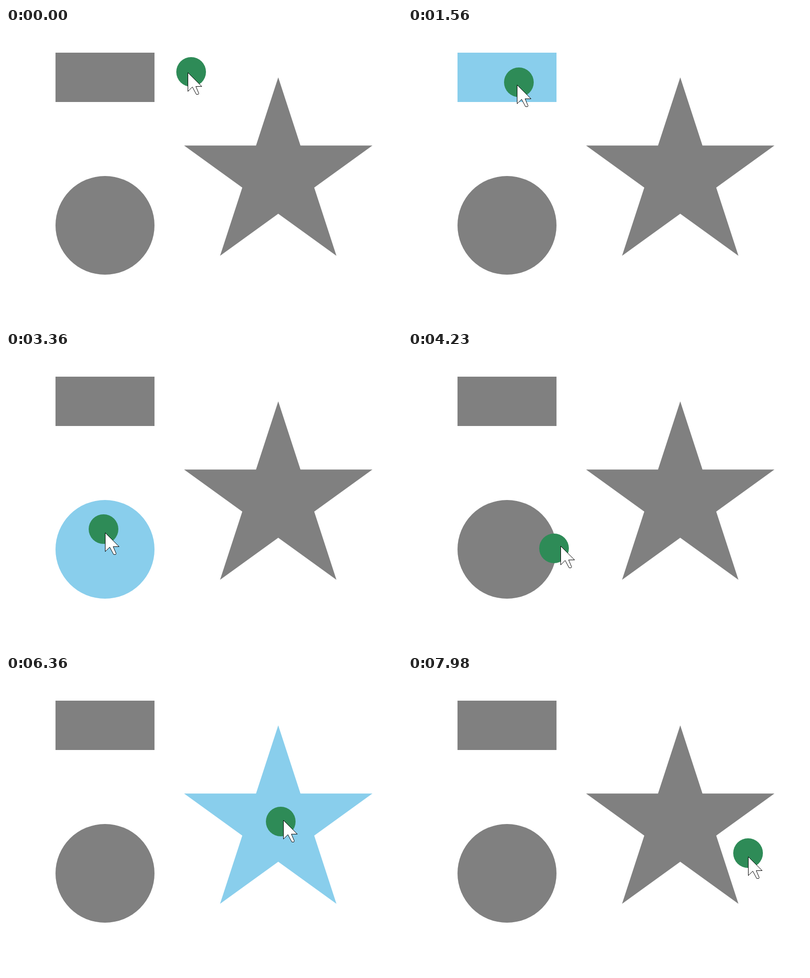
Recreate the animation shown at these times as an HTML page with a canvas. Size 800 px wide and 600 px high, loop 8 s.

```html
<!DOCTYPE html>
<html lang="en">
<head>
<meta charset="utf-8">
<title>Ball inside shapes</title>
<style>
  html, body { margin: 0; width: 100%; height: 100%; overflow: hidden; background: #fff; }
  canvas { display: block; }
</style>
</head>
<body>
<canvas width="800" height="600"></canvas>
<script>
const ctx = document.querySelector('canvas').getContext('2d');
const LOOP = 8000, STEP = 30, LAG = 2, RADIUS = 30;

// Key points of the pointer's path: [step, x, y]
const route = [
  [0, 373.6, 89], [29, 282, 101], [53, 221.5, 112.5], [70, 194, 173],
  [83, 192, 246], [108, 192, 346], [137, 272, 408], [142, 301.5, 395.5],
  [158, 434, 369], [181, 498.4, 365], [191, 516, 359], [213, 557.5, 293.5],
  [243, 634, 290], [260, 686.5, 338], [268, 687, 366]
];

function polygon(points) {
  const path = new Path2D();
  points.forEach(([x, y]) => path.lineTo(x, y));
  path.closePath();
  return path;
}

function disc(x, y, r) {
  const path = new Path2D();
  path.arc(x, y, r, 0, 2 * Math.PI);
  return path;
}

const rectangle = new Path2D();
rectangle.rect(100, 50, 200, 100);

const star = polygon(Array.from({ length: 10 }, (_, i) => {
  const r = i % 2 ? 76.4 : 200, angle = i * Math.PI / 5;
  return [550 + r * Math.sin(angle), 300 - r * Math.cos(angle)];
}));

const shapes = [rectangle, disc(200, 400, 100), star];

const arrow = polygon([
  [0, 0], [0, 38], [9, 29], [17, 44], [21, 44], [22, 42], [16, 28], [28, 28]
]);

// Average speed between key points i and i + 1
function speed(i, axis) {
  const a = route[i], b = route[i + 1];
  return (b[axis] - a[axis]) / (b[0] - a[0]);
}

// Speed at key point i, weighted towards the shorter neighbouring span
function slope(i, axis) {
  const last = route.length - 1;
  if (i === 0 || i === last) return speed(Math.min(i, last - 1), axis);
  const before = route[i][0] - route[i - 1][0], after = route[i + 1][0] - route[i][0];
  return (after * speed(i - 1, axis) + before * speed(i, axis)) / (before + after);
}

// Cubic Hermite interpolation along the route
function pointAt(step) {
  const i = Math.max(0, route.findIndex(p => p[0] >= step) - 1);
  const a = route[i], b = route[i + 1];
  const span = b[0] - a[0], u = (step - a[0]) / span, v = 1 - u;
  return [1, 2].map(axis => Math.round(
    v * v * (1 + 2 * u) * a[axis] + u * u * (3 - 2 * u) * b[axis] +
    span * u * v * (v * slope(i, axis) - u * slope(i + 1, axis))
  ));
}

// The whole ball lies inside when every rim point does
function contains(shape, x, y) {
  for (let i = 0; i < 64; i++) {
    const angle = i * Math.PI / 32;
    const rimX = x + RADIUS * Math.cos(angle), rimY = y + RADIUS * Math.sin(angle);
    if (!ctx.isPointInPath(shape, rimX, rimY)) return false;
  }
  return true;
}

function fill(path, color) {
  ctx.fillStyle = color;
  ctx.fill(path);
}

function draw(time) {
  const step = Math.floor(time % LOOP / STEP);
  const [ballX, ballY] = pointAt(step);
  const [tipX, tipY] = pointAt(step + LAG);

  ctx.clearRect(0, 0, 800, 600);
  for (const shape of shapes) {
    fill(shape, contains(shape, ballX, ballY) ? '#89ceec' : '#808080');
  }
  fill(disc(ballX, ballY, RADIUS), '#2e8b57');

  ctx.save();
  ctx.translate(tipX + 0.5, tipY + 0.5);
  fill(arrow, '#fff');
  ctx.stroke(arrow);
  ctx.restore();
}

const start = performance.now();
function tick() {
  draw(performance.now() - start);
  requestAnimationFrame(tick);
}
tick();
</script>
</body>
</html>
```
